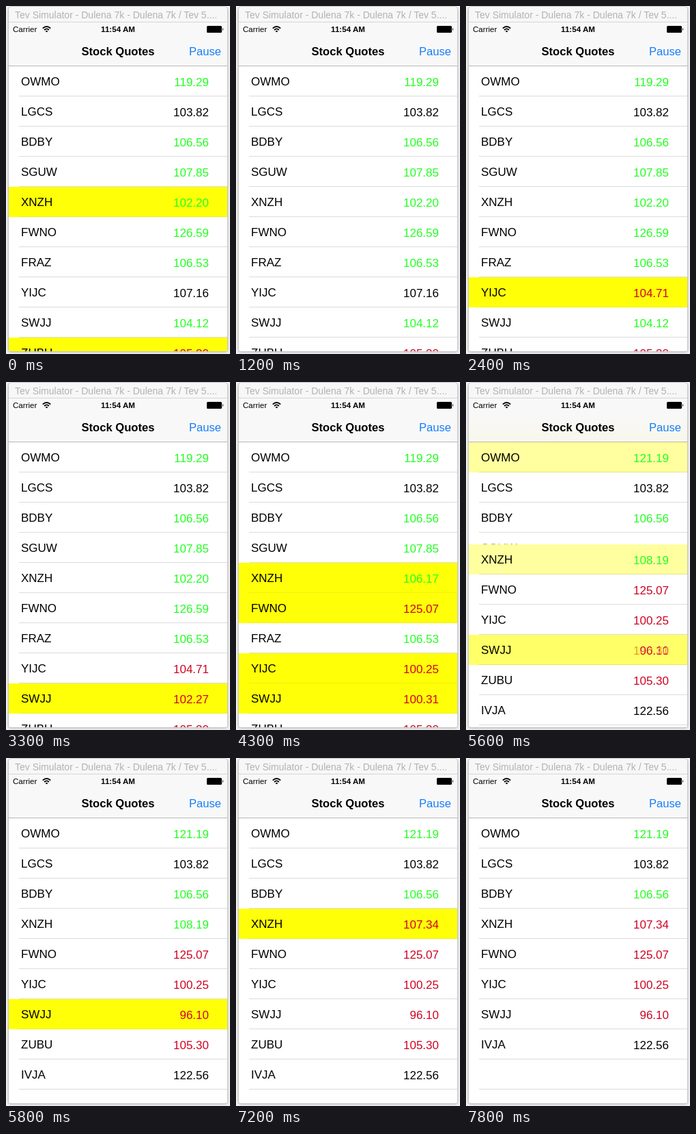
Animation, 328 px wide and 508 px high, one loop 8000 ms. Source, as an HTML page:

```html
<!DOCTYPE html>
<html lang="en">
<head>
<meta charset="utf-8">
<title>Stock Quotes</title>
<style>
html, body { margin: 0; width: 100%; height: 100%; overflow: hidden; background: #f3f3f3; }
body { position: relative; font: 17px/20px "Liberation Sans", Arial, sans-serif; color: #000; }
div, span, svg { position: absolute; white-space: nowrap; }
#window { left: 4px; top: 1px; width: 320px; height: 503px; overflow: hidden; background: #fff;
  border-radius: 5px 5px 3px 3px; }
#shadow { left: 4px; top: 1px; width: 320px; height: 503px; border-radius: 5px 5px 3px 3px;
  box-shadow: 0 0 0 1px #c4c4c4, 0 1px 4px rgba(0, 0, 0, .3); }
#table { left: 0; top: 0; width: 320px; height: 503px; }
#caption { left: 0; top: 0; width: 320px; height: 22px; background: #f7f7f7; border-bottom: 1px solid #d6d6d6; }
#caption span { left: 9px; top: 2px; font-size: 14px; color: #b2b2b2; }
#bar { left: 0; top: 23px; width: 320px; height: 63px; background: #f8f8f8; border-bottom: 1px solid #b8b8b8; }
#tint { left: 0; top: 0; width: 320px; height: 63px; background: linear-gradient(#f8f8f800 35%, #f9f5d8); }
#bar span { top: 33px; font-size: 16.6px; }
#bar .small { top: 0; font-size: 11.6px; }
.mid { left: 0; width: 320px; text-align: center; font-weight: bold; }
.row { left: 0; width: 320px; height: 44px; background: #fff; }
.row::after { content: ""; position: absolute; left: 15px; right: 0; top: 43px; height: 1px;
  background: rgba(60, 60, 67, .18); }
.row.hot { background: #ffff08; }
.row.hot::after { opacity: .4; }
.name { left: 18px; top: 13px; }
.price { right: 27px; top: 14px; }
.g { color: #21ff21; } .r { color: #cf0222; } .k { color: #000; }
</style>
</head>
<body>
<div id="shadow"></div>
<div id="window">
  <div id="table"></div>
  <div id="bar">
    <div id="tint"></div>
    <span class="small" style="left:6px">Carrier</span>
    <svg style="left:49px;top:5px" width="13" height="10" fill="none" stroke="#000" stroke-width="1.8">
      <path d="M.8 3.6Q6.5-1.6 12.2 3.6M3 6Q6.5 2.8 10 6"/><path d="M4.6 7.4 6.5 9.6 8.4 7.4Q6.5 6 4.6 7.4Z" fill="#000" stroke="none"/>
    </svg>
    <span class="small mid">11:54 AM</span>
    <svg style="left:290px;top:5px" width="25" height="10">
      <rect width="22" height="10" rx="1.5"/><path d="M23 3q2 2 0 4z"/>
    </svg>
    <span class="mid">Stock Quotes</span>
    <span style="right:9px;color:#157efb">Pause</span>
  </div>
  <div id="caption"><span>Tev Simulator - Dulena 7k - Dulena 7k / Tev 5....</span></div>
</div>
<script>
const LOOP = 8000, FADE = 350, TOP = 87, ROW = 44;

// Prices carry their colour as first letter: g rising, r falling, k unchanged.
const opening = {
  OWMO: "g119.29", LGCS: "k103.82", BDBY: "g106.56", SGUW: "g107.85", XNZH: "g102.20", FWNO: "g126.59",
  FRAZ: "g106.53", YIJC: "k107.16", SWJJ: "g104.12", ZUBU: "r105.30", IVJA: "k122.56"
};

// start time, updated prices, removed stock
const ticks = [
  [-1000, { XNZH: "g102.20", ZUBU: "r105.30" }],
  [80, {}],
  [1200, { YIJC: "r104.71" }],
  [2400, { SWJJ: "r102.27" }],
  [3530, { XNZH: "g106.17", FWNO: "r125.07", YIJC: "r100.25", SWJJ: "r100.31" }],
  [4470, { OWMO: "g121.19", XNZH: "g108.19" }, "FRAZ"],
  [5400, { SWJJ: "r96.10" }, "SGUW"],
  [6270, { XNZH: "r107.34" }],
  [7450, {}, "ZUBU"]
];

let prices = opening;
const states = ticks.map(([, changed, removed]) => {
  prices = { ...prices, ...changed };
  delete prices[removed];
  return { prices, changed, names: Object.keys(prices) };
});

const table = document.getElementById("table");
const tint = document.getElementById("tint");
const ease = x => x * x * (3 - 2 * x);
const isHot = (state, name) => name in state.changed;

function row(state, name, y, opacity = 1) {
  const price = state.prices[name];
  return `<div class="row${isHot(state, name) ? " hot" : ""}" style="top:${y}px;opacity:${opacity}">` +
    `<span class="name">${name}</span><span class="price ${price[0]}">${price.slice(1)}</span></div>`;
}

let blanks = "";
for (let i = 0; i < 10; i++) blanks += `<div class="row" style="top:${TOP + i * ROW}px"></div>`;

function draw(t) {
  const k = ticks.findLastIndex(([start]) => start <= t);
  const p = ease(Math.min(1, (t - ticks[k][0]) / FADE));
  const to = states[k], from = states[k - 1] || to;
  let gone = "", kept = "";
  from.names.forEach((name, i) => {
    const j = to.names.indexOf(name);
    if (j < 0) {
      gone += row(from, name, TOP + i * ROW, 1 - p);
      return;
    }
    const y = TOP + (i + (j - i) * p) * ROW;
    if (p < 1) kept += row(from, name, y);
    if (p > 0) kept += row(to, name, y, p);
  });
  table.innerHTML = blanks + gone + kept;
  tint.style.opacity = isHot(from, "OWMO") * (1 - p) + isHot(to, "OWMO") * p;
}

const begin = performance.now();
function frame() {
  draw((performance.now() - begin) % LOOP);
  requestAnimationFrame(frame);
}
frame();
</script>
</body>
</html>
```
